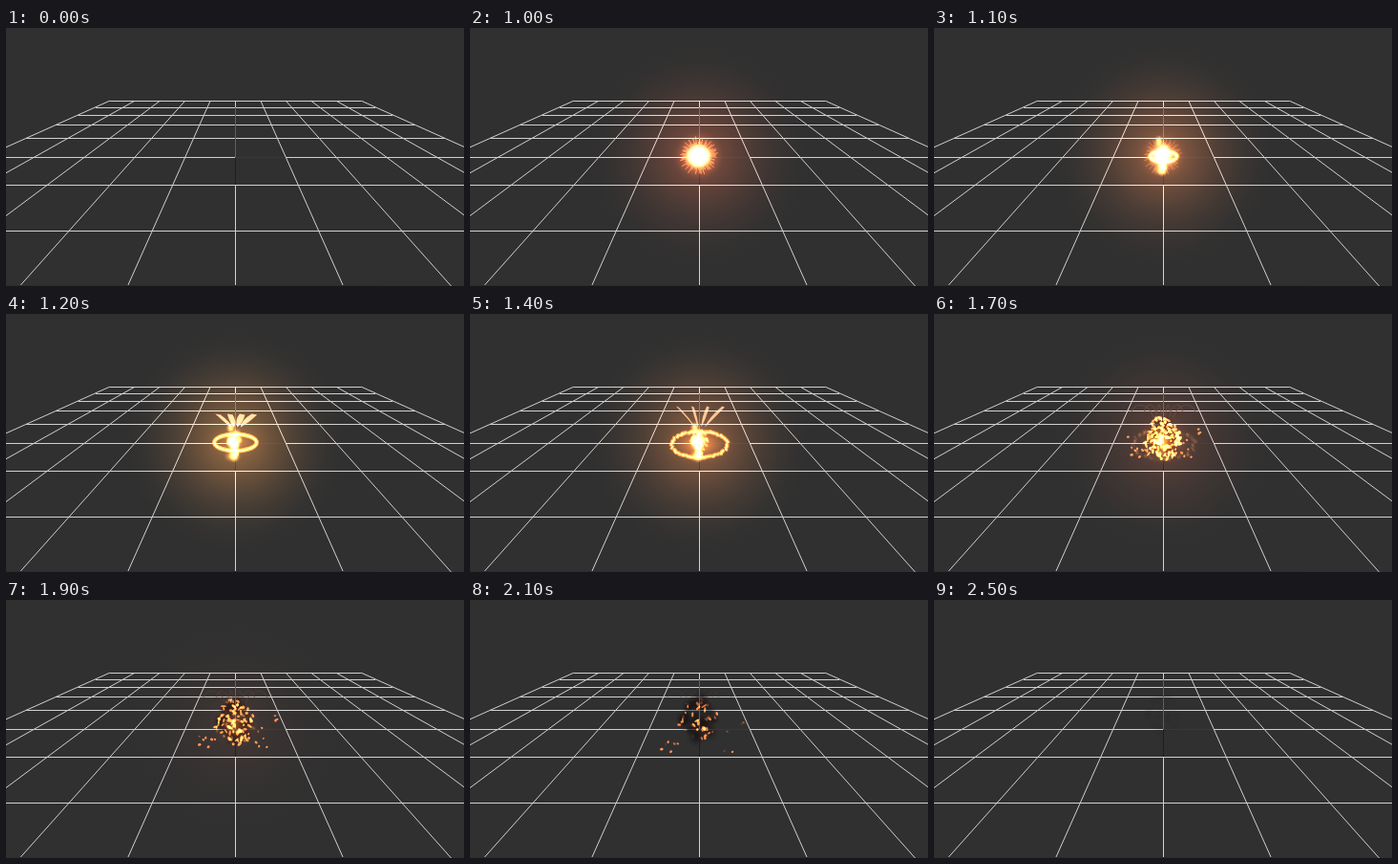
An HTML page with a canvas that plays this animation: 480 px wide and 270 px high, repeating every 2.55 s.

```html
<!DOCTYPE html>
<html lang="en">
<head>
<meta charset="utf-8">
<title>Burst on a grid</title>
<style>
html, body { margin: 0; width: 100%; height: 100%; overflow: hidden; background: #303030; }
canvas { display: block; width: 480px; height: 270px; }
</style>
</head>
<body>
<canvas id="stage" width="480" height="270"></canvas>
<script>
const ctx = document.getElementById('stage').getContext('2d');
const LOOP = 2550, STEP = 50, START = 1000, TAU = Math.PI * 2;
const CX = 240.5, CY = 135.5;

function seeded(s) {
  return () => {
    s = (s + 0x6D2B79F5) | 0;
    let t = Math.imul(s ^ (s >>> 15), 1 | s);
    t = (t + Math.imul(t ^ (t >>> 7), 61 | t)) ^ t;
    return ((t ^ (t >>> 14)) >>> 0) / 4294967296;
  };
}

const mix = (a, b, k) => a + (b - a) * k;
const ramp = (u, from, to) => Math.min(1, Math.max(0, (u - from) / (to - from)));
const pulse = (u, on, full, hold, off) => ramp(u, on, full) * (1 - ramp(u, hold, off));
const settle = (u, tau) => 1 - Math.exp(-u / tau);
const rgba = (color, a) => `rgba(${color},${a.toFixed(3)})`;

function line(x1, y1, x2, y2, color) {
  ctx.strokeStyle = color;
  ctx.lineWidth = 1;
  ctx.beginPath();
  ctx.moveTo(x1, y1);
  ctx.lineTo(x2, y2);
  ctx.stroke();
}

function glow(x, y, rx, ry, color, alpha, core = 0) {
  if (alpha <= 0) return;
  ctx.save();
  ctx.translate(x, y);
  ctx.scale(rx, ry);
  const g = ctx.createRadialGradient(0, 0, 0, 0, 0, 1);
  for (let i = 0; i <= 6; i++) {
    g.addColorStop(Math.min(1, mix(core, 1, i / 6)), rgba(color, Math.min(1, alpha) * (1 - i / 6) ** 1.8));
  }
  ctx.fillStyle = g;
  ctx.beginPath();
  ctx.arc(0, 0, 1, 0, TAU);
  ctx.fill();
  ctx.restore();
}

function shard(x, y, w, h, turn, color, alpha) {
  ctx.fillStyle = rgba(color, alpha);
  ctx.beginPath();
  ctx.ellipse(x, y, w, h, turn, 0, TAU);
  ctx.fill();
}

// Ground plane seen in perspective: unit width grows linearly below the horizon.
function grid() {
  const horizon = 17.2, slope = 0.447, focal = 265, white = '#d0d0d0';
  const far = focal / 10.04, near = (271 - horizon) * slope;
  for (let z = 10.04; z > 3; z--) {
    const unit = focal / z, y = Math.round(horizon + unit / slope) + 0.5;
    line(CX - unit * 5, y, CX + unit * 5, y, white);
  }
  for (let i = -5; i <= 5; i++) line(CX + i * far, horizon + far / slope, CX + i * near, 271, white);
  line(0, 269.5, 390, 269.5, '#40252a');
}

function axes() {
  line(CX, CY, 293, CY, '#841616');
  line(CX, CY, CX, 83, '#0a9a0a');
  line(CX, CY, CX, 164, '#10108c');
}

function flash(u) {
  const a = 1 - ramp(u, 0, 200);
  if (!a) return;
  const rnd = seeded(5);
  glow(CX - 1, 134, 27, 27, '255,105,35', 0.85 * a, 0.2);
  for (let i = 0; i < 80; i++) {
    const dx = Math.cos(i / 80 * TAU), dy = Math.sin(i / 80 * TAU), r = 12 + rnd() * 9;
    line(CX - 1 + dx * 7, 134 + dy * 7, CX - 1 + dx * r, 134 + dy * r, rgba('255,130,60', 0.5 * a));
  }
  glow(CX - 1, 134, 15, 14, '255,240,190', a, 0.5);
}

function ring(u) {
  const a = pulse(u, 0, 100, 450, 750);
  if (!a) return;
  const rnd = seeded(23), lean = ramp(u, 200, 400), broken = ramp(u, 200, 700);
  const rx = 33 * settle(u, 180), ry = rx * mix(0.39, 0.46, lean), y = mix(134.5, 136.5, lean);
  glow(CX, y, rx + 8, ry + 8, '255,110,20', a * mix(0.3, 0.55, lean));
  for (let i = 0; i < 56; i++) {
    const d = i / 56 * TAU, keep = a * (1 - broken * rnd()), shift = (rnd() - 0.5) * 4 * broken;
    for (const [width, color] of [[4.5, '255,125,25'], [1.8, '255,230,140']]) {
      ctx.strokeStyle = rgba(color, keep * 0.8);
      ctx.lineWidth = width;
      ctx.beginPath();
      ctx.ellipse(CX, y, rx + shift, ry + shift * 0.6, 0, d, d + TAU / 56);
      ctx.stroke();
    }
  }
}

function pillar(u) {
  const a = pulse(u, 0, 100, 400, 750);
  const rnd = seeded(41);
  for (let i = 0; i < 15; i++) {
    const r = 2.5 + rnd() * 4;
    glow(CX - 1 + (rnd() - 0.5) * 12, 118 + rnd() * 34, r, r * 1.3, '255,200,90', a * mix(0.5, 0.9, rnd()), 0.25);
  }
  glow(CX - 2, 134, 9, 11, '255,235,160', a * 0.9, 0.35);
  glow(CX - 3, 149, 10, 7, '255,165,60', a * 0.7, 0.2);
}

// Four tongues of flame splaying upwards.
function arms(u) {
  const a = 0.75 * pulse(u, 100, 200, 350, 650);
  if (!a) return;
  const out = settle(u, 150), fat = mix(4.6, 2.2, ramp(u, 200, 400));
  ctx.fillStyle = rgba('255,190,140', a);
  for (let i = 0; i < 4; i++) {
    const dx = mix(-25, 27, i / 3);
    const x = CX + dx * out, y = CY - 42 * out, bx = CX + dx * 0.2, by = CY - 17;
    const mx = (x + bx) / 2 - dx * 0.1, my = (y + by) / 2;
    ctx.beginPath();
    ctx.moveTo(bx, by);
    ctx.quadraticCurveTo(mx - fat, my, x - fat * 0.6, y);
    ctx.lineTo(x + fat * 0.6, y + 1);
    ctx.quadraticCurveTo(mx + fat, my + 2, bx, by);
    ctx.fill();
  }
}

function trails(u) {
  ctx.lineWidth = 1.4;
  ctx.strokeStyle = rgba('84,66,58', 0.6 * pulse(u, 500, 650, 700, 1350));
  for (let i = 0; i < 6; i++) {
    const tip = mix(-34, 34, i / 5);
    ctx.beginPath();
    ctx.moveTo(CX + tip * 0.3, 108);
    ctx.bezierCurveTo(CX + tip * 0.5, 92, CX + tip * 0.85, 92, CX + tip, 103);
    ctx.stroke();
  }
}

function smoke(u) {
  const a = 0.5 * pulse(u, 400, 700, 1050, 1530);
  const rnd = seeded(77), grow = mix(0.5, 1, ramp(u, 400, 1000)), y = mix(131, 119, ramp(u, 600, 1500));
  for (let i = 0; i < 44; i++) {
    const d = rnd() * TAU, r = Math.sqrt(rnd()) * grow, size = 5 + rnd() * 7;
    const color = rnd() < 0.3 ? '44,28,25' : '22,18,18';
    glow(CX - 1 + Math.cos(d) * r * 18, y + Math.sin(d) * r * 24, size, size, color, a, 0.2);
  }
}

function fireball(u) {
  const rnd = seeded(112), cool = ramp(u, 500, 1250);
  const body = 0.5 * pulse(u, 350, 600, 650, 1100);
  const grow = mix(0.45, 1, ramp(u, 350, 750)), y = mix(133, 125, ramp(u, 400, 1100));
  glow(CX, y + 2, 30 * grow, 30 * grow, '255,95,15', body);
  glow(CX - 2, y + 4, 12, 14, '255,190,80', body, 0.1);
  for (let i = 0; i < 150; i++) {
    const d = rnd() * TAU, r = Math.sqrt(rnd()), turn = rnd() * TAU + u / 900;
    const w = 1.2 + rnd() * 1.9, h = 0.8 + rnd() * 0.8, heat = rnd() * (1.1 - r);
    const born = 350 + rnd() * 250, dies = 780 + rnd() ** 2 * 480 + (1 - r) * 130;
    const a = 0.9 * pulse(u, born, born + 80, dies - 120, dies);
    if (!a) continue;
    const green = Math.round(mix(180, 90, cool) + heat * 60);
    shard(CX - 1 + Math.cos(d) * r * grow * (21 + 4 * Math.sin(d)), y + Math.sin(d) * r * grow * 25,
      w, h, turn, `255,${green},${Math.round(green * 0.4)}`, a);
  }
}

function embers(u) {
  if (u < 450) return;
  const rnd = seeded(208), out = mix(0.5, 1.05, settle(u - 450, 250)), fall = 8 * ((u - 450) / 650) ** 2;
  for (let i = 0; i < 18; i++) {
    const reach = (18 + rnd() * 28) * (i % 2 ? 1 : -1), lift = (rnd() - 0.55) * 36;
    const dies = 850 + rnd() * 500, size = 0.7 + rnd() * 0.7;
    const a = 0.9 * pulse(u, 450, 550, dies - 150, dies);
    shard(CX + reach * out, CY + lift * out + fall, size * 1.3, size, lift, '255,115,40', a);
  }
}

function draw(time) {
  const u = Math.floor((time % LOOP) / STEP) * STEP - START;
  ctx.globalCompositeOperation = 'source-over';
  ctx.fillStyle = '#303030';
  ctx.fillRect(0, 0, 480, 270);
  grid();
  if (u < 0) return axes();
  trails(u);
  smoke(u);
  axes();
  ctx.globalCompositeOperation = 'lighter';
  const warm = Math.round(mix(95, 145, pulse(u, 0, 200, 250, 700)));
  glow(CX, 133, 115, 115, `255,${warm},50`, 0.48 * pulse(u, -500, 150, 350, 1000));
  flash(u);
  arms(u);
  ring(u);
  pillar(u);
  fireball(u);
  embers(u);
}

const t0 = performance.now();
function tick() {
  draw(performance.now() - t0);
  requestAnimationFrame(tick);
}
tick();
</script>
</body>
</html>
```
